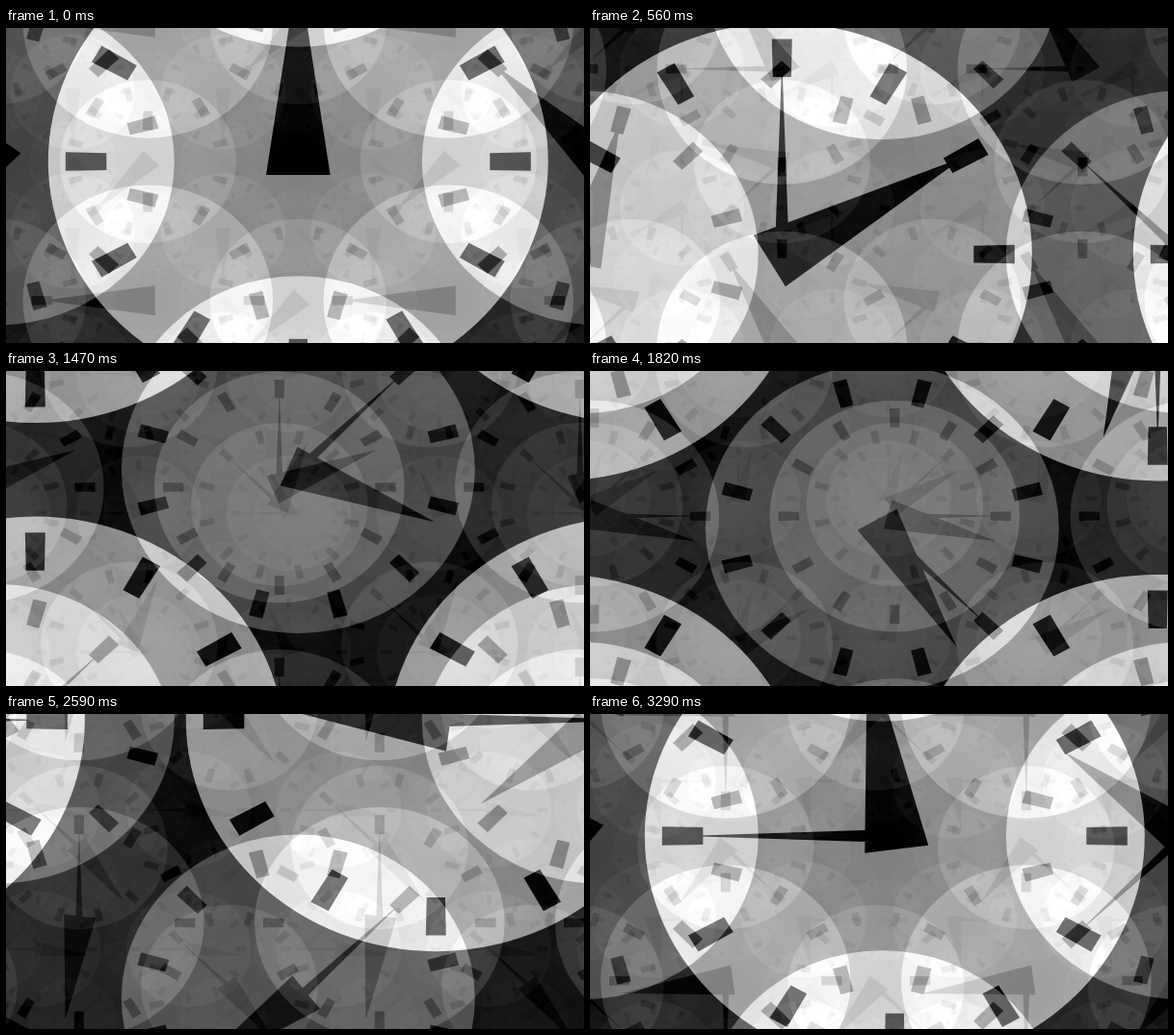
Write an HTML page with a canvas that moves like this. It is 600 by 328 pixels and loops after 3.36 s.

```html
<!DOCTYPE html>
<html lang="en">
<head>
<meta charset="utf-8">
<title>Clocks within clocks</title>
<style>
  html, body { margin: 0; width: 100%; height: 100%; overflow: hidden; background: #000; }
  canvas { display: block; }
</style>
</head>
<body>
<canvas id="stage" width="600" height="328"></canvas>
<script>
const W = 600, H = 328;
const STEPS = 48, STEP_MS = 70;
const LAYERS = 8;
const CELL = 624, FACE = 259.5;
const SQUASH = 0.928;
const ORIGIN = { x: -8.7, y: -150.5 };
const TURN = Math.PI * 2;

const stage = document.getElementById('stage').getContext('2d');
const buffer = document.createElement('canvas');
buffer.width = W;
buffer.height = H;
const ctx = buffer.getContext('2d');

const face = new Path2D();
face.arc(0, 0, FACE, 0, TURN);

// Adds a polygon turned clockwise by the given angle.
function addPoly(path, points, angle) {
  const c = Math.cos(angle), s = Math.sin(angle);
  points.forEach(([x, y], i) => {
    const px = x * c - y * s, py = x * s + y * c;
    if (i) path.lineTo(px, py);
    else path.moveTo(px, py);
  });
  path.closePath();
}

const MARK = [[-9.6, -199], [9.6, -199], [10.5, -241.5], [-10.5, -241.5]];
const hand = half => [[-half, 15], [half, 15], [0, -218]];
const HOUR = hand(33.3), MINUTE = hand(8);

// Marks and hands at a time given as a fraction of twelve hours.
function dialInk(time) {
  const path = new Path2D();
  for (let i = 0; i < 12; i++) addPoly(path, MARK, i / 12 * TURN);
  addPoly(path, HOUR, time * TURN);
  addPoly(path, MINUTE, time * 12 % 1 * TURN);
  return path;
}

// Each layer is turned by -45 degrees, shrunk by the root of two and half as bright.
function drawLayer(k, time, ink) {
  const scale = Math.pow(2, -k / 2), angle = -k * TURN / 8;
  const c = Math.cos(angle) * scale, s = Math.sin(angle) * scale;
  const reach = FACE * scale + 2;
  const n = Math.ceil(800 / (CELL * scale)) + 2;
  const level = 128 >> k;

  ctx.setTransform(1, 0, 0, 1, 0, 0);
  ctx.fillStyle = '#000';
  ctx.fillRect(0, 0, W, H);
  for (let i = -n; i <= n; i++) {
    for (let j = -n; j <= n; j++) {
      const u = (i + 0.5 - time) * CELL, v = (j + 0.5 + time) * CELL;
      const x = ORIGIN.x + u * c - v * s;
      const y = ORIGIN.y + (u * s + v * c) * SQUASH;
      if (x < -reach || x > W + reach || y < -reach || y > H + reach) continue;
      ctx.setTransform(c, s * SQUASH, -s, c * SQUASH, x, y);
      ctx.fillStyle = `rgb(${level},${level},${level})`;
      ctx.fill(face);
      ctx.fillStyle = '#000';
      ctx.fill(ink);
    }
  }
  stage.drawImage(buffer, 0, 0);
}

function draw(step) {
  const time = step / STEPS;
  const ink = dialInk(time);
  stage.globalCompositeOperation = 'source-over';
  stage.fillStyle = '#000';
  stage.fillRect(0, 0, W, H);
  stage.globalCompositeOperation = 'lighter';
  for (let k = 0; k < LAYERS; k++) drawLayer(k, time, ink);
}

let shown = 0;
const start = performance.now();

function tick() {
  const elapsed = Math.max(0, performance.now() - start);
  const step = Math.floor(elapsed / STEP_MS) % STEPS;
  if (step !== shown) draw(shown = step);
  requestAnimationFrame(tick);
}

draw(0);
requestAnimationFrame(tick);
</script>
</body>
</html>
```
